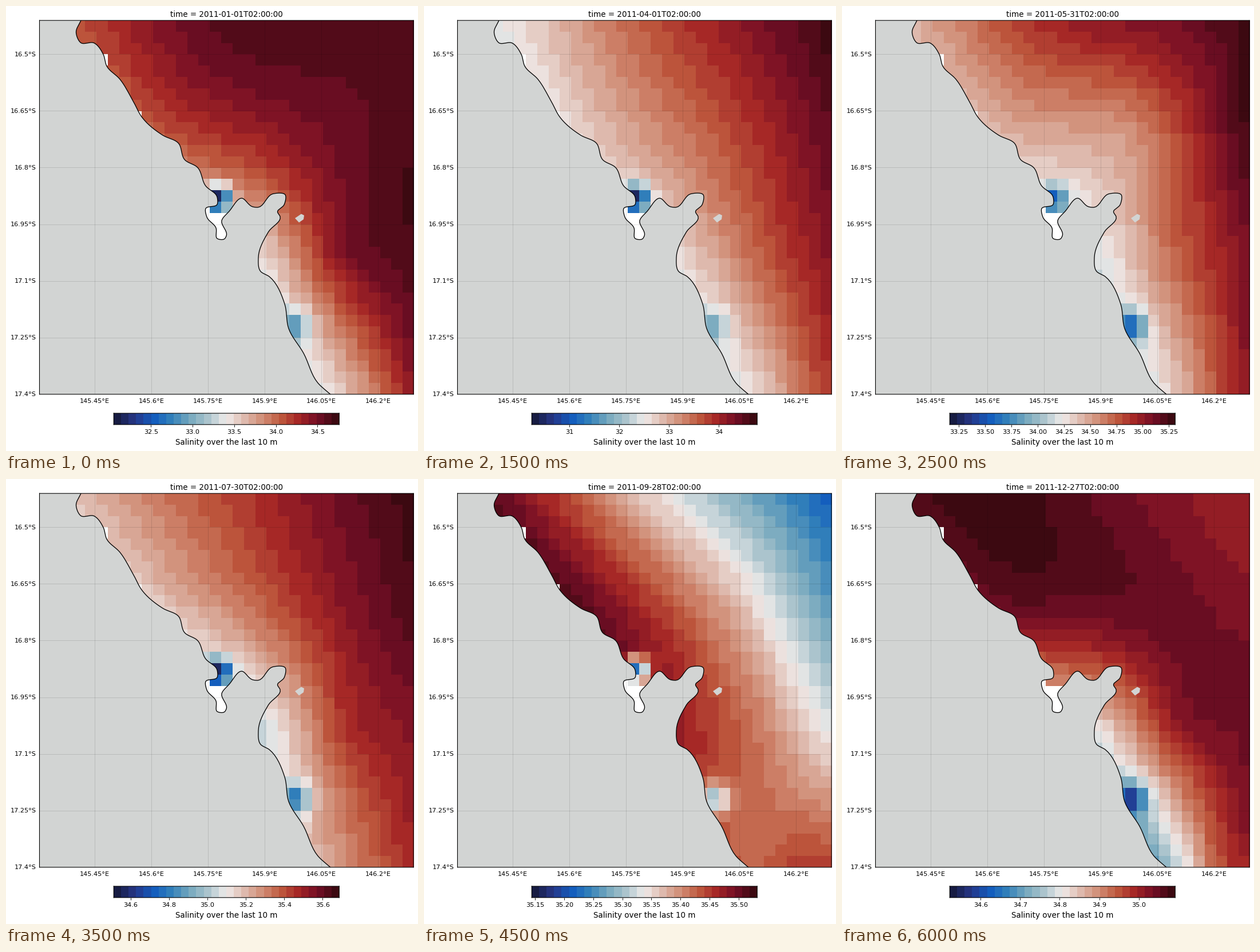
Recreate the animation shown at these times as a matplotlib script. Size 720 by 778 pixels, loop 6500 ms.

```python
import numpy as np
import matplotlib.pyplot as plt
from matplotlib.animation import FuncAnimation
from matplotlib.colors import LinearSegmentedColormap
from matplotlib.patches import Polygon
from matplotlib.ticker import MaxNLocator, ScalarFormatter

W, H = 720, 778
DPI = 100
PX = 72 / DPI  # points per pixel
L, R, T, B = 58.5, 712.1, 25.2, 678.8
CELLS = 33
BANDS = 30
FRAMES = 13
STEP = 99.05  # pixels between grid lines
LAND = "#d2d4d3"

plt.rcParams["font.family"] = "DejaVu Sans"

cmap = LinearSegmentedColormap.from_list("salt", [
    "#171c42", "#273789", "#125cbe", "#3482ba", "#76a8be", "#adc6ce",
    "#f0eceb", "#dfbbaf", "#d18d76", "#bf5a3e", "#a52525", "#730e26",
    "#3c0911"], N=BANDS)

# Key points of the coast in stage pixels, north to south
COAST = [
    (131, 25), (122.5, 46), (131, 64.5), (153.5, 64.5), (170, 84.5),
    (176, 105), (199, 128), (221.5, 165), (238, 195), (274, 226),
    (301.5, 240), (312, 268.5), (335, 282.5), (348.5, 314), (369, 334),
    (369, 347), (349, 354), (351, 369), (367, 388), (369, 406.5), (382, 407),
    (385, 402), (377, 375), (390, 359), (412, 336), (431, 351), (440, 352),
    (466, 328.5), (488, 330), (486, 347.5), (474.5, 360), (479, 368),
    (458.5, 395), (441, 440), (444.5, 463.5), (460, 473), (487, 521),
    (494, 564), (520, 607), (545, 659), (567, 679),
]
ISLAND = [(505, 371), (516, 363.5), (521, 366), (520, 373), (512, 378.5)]

# Four sections of the sea: row, column at the coast
SECTIONS = [(0, 4), (10, 12), (20, 20), (32, 26)]
EAST = CELLS - 1
NODES = np.array([(c, r) for r, coast in SECTIONS
                  for c in (coast, (coast + EAST) / 2, EAST)], float)
ROWS, COLS = np.mgrid[:CELLS, :CELLS].astype(float)

# Stored months: step -> salinity range, fresh water from the inlet and the
# southern river, and (coast, middle, east) of each section, as shares of range
MONTHS = {
    0: (32.054, 34.761, 0.62, 0.24,
        (.78, .975, .975), (.77, .88, .975), (.57, .89, .97), (.56, .70, .86)),
    1: (30.677, 34.993, 0.52, 0.10,
        (.62, .78, 1), (.57, .74, .925), (.51, .69, .86), (.52, .62, .74)),
    3: (30.240, 34.778, 0.55, 0.17,
        (.50, .78, 1), (.57, .74, .935), (.56, .74, .88), (.54, .68, .79)),
    5: (33.163, 35.310, 0.36, 0.32,
        (.62, .86, 1), (.60, .65, .98), (.51, .74, .89), (.57, .73, .87)),
    7: (34.512, 35.686, 0.50, 0.32,
        (.59, .81, 1), (.585, .79, .965), (.49, .80, .885), (.66, .74, .83)),
    9: (35.144, 35.532, 0.75, 0.38,
        (.92, .51, .18), (.93, .67, .32), (.83, .70, .49), (.735, .78, .78)),
    12: (34.522, 35.092, 0, 0.35,
         (.975, .95, .85), (.925, .935, .90), (.56, .865, .92),
         (.44, .72, .84)),
}


def smooth(points, steps=8):
    """Hermite curve through key points, spaced by chord length."""
    p = np.array(points, float)
    s = np.append(0, np.cumsum(np.hypot(*np.diff(p, axis=0).T)))
    slope = np.gradient(p, s, axis=0)
    t = np.linspace(0, 1, steps, endpoint=False)[:, None]
    ease = t * t * (3 - 2 * t)
    curve = [a + (b - a) * ease
             + d * (t * (1 - t) ** 2 * m0 - t * t * (1 - t) * m1)
             for a, b, d, m0, m1 in zip(p, p[1:], np.diff(s), slope, slope[1:])]
    return np.vstack(curve + [p[-1:]])


def kernel(a, b):
    """Thin plate spline kernel between two sets of points."""
    d2 = ((a[:, None] - b[None]) ** 2).sum(-1)
    return 0.5 * d2 * np.log(d2 + 1e-12)


def with_plane(points):
    return np.column_stack([np.ones(len(points)), points])


def surface(values):
    """Smooth surface through the section values, on every cell."""
    plane = with_plane(NODES)
    system = np.block([[kernel(NODES, NODES), plane],
                       [plane.T, np.zeros((3, 3))]])
    weights = np.linalg.solve(system, np.append(values, [0, 0, 0]))
    cells = np.column_stack([COLS.ravel(), ROWS.ravel()])
    basis = np.hstack([kernel(cells, NODES), with_plane(cells)])
    return (basis @ weights).reshape(CELLS, CELLS)


def plume(col, row, spread):
    return np.exp(-((COLS - col) ** 2 + (ROWS - row) ** 2) / spread)


def month(low, high, inlet, river, *sections):
    share = np.clip(surface(np.ravel(sections)), 0, 1)
    share -= inlet * plume(15.2, 15.2, 1.3) + river * plume(22, 26.4, 2)
    share = np.clip(share, 0, 1)
    # Cells without data: the head of the inlet and two spots on the shore
    share[17:, :17] = share[16, 14] = share[3, 5] = share[8, 8] = np.nan
    return low, high, low + share * (high - low)


fields = {step: month(*data) for step, data in MONTHS.items()}


def state(i):
    """Range and salinity of a step, blended between stored months."""
    before = max(k for k in fields if k <= i)
    after = min(k for k in fields if k >= i)
    t = (i - before) / max(after - before, 1)
    return [a + (b - a) * t for a, b in zip(fields[before], fields[after])]


def box(left, top, right, bottom):
    """Axes over a rectangle given in stage pixels."""
    axes = fig.add_axes([left / W, 1 - bottom / H,
                         (right - left) / W, (bottom - top) / H])
    for spine in axes.spines.values():
        spine.set(linewidth=1.1 * PX, snap=False)
    return axes


fig = plt.figure(figsize=(W / DPI, H / DPI), dpi=DPI, facecolor="white")

sea = box(L, T, R, B)
half = 0.5 / (BANDS - 1)
image = sea.imshow(np.zeros((CELLS, CELLS)), cmap=cmap, vmin=-half,
                   vmax=1 + half, extent=(L, R, B, T), aspect="auto",
                   interpolation="nearest")
coast = smooth(COAST)
shore = np.vstack([coast, [(50, 679), (50, 25)]])
for outline in (shore, ISLAND):
    sea.add_patch(Polygon(outline, fc=LAND, ec="none"))
sea.plot(*coast.T, color="black", lw=1.3 * PX, zorder=4)
sea.set(xlim=(L, R), ylim=(B, T), xticks=[], yticks=[])


def write(x, y, text, size, ha="center"):
    return sea.text(x, y, text, size=size * PX, ha=ha, va="baseline")


def degrees(start, k, side):
    return f"{start + 0.15 * k:.2f}".rstrip("0") + "°" + side


grid = dict(color="black", alpha=0.13, lw=0.9 * PX, zorder=3)
for k in range(7):
    y = 84.4 + STEP * k
    sea.axhline(y, **grid)
    write(52.5, y + 3.6, degrees(16.5, k, "S"), 11.2, "right")
for k in range(6):
    x = 155 + STEP * k
    sea.axvline(x, **grid)
    write(x, 694.3, degrees(145.45, k, "E"), 11.2)
title = write((L + R) / 2, 19, "", 13.5)
write((L + R) / 2, 767.5, "Salinity over the last 10 m", 13.5)

bar = box(188.3, 712, 582.3, 731.8)
ramp = bar.imshow(np.arange(BANDS)[None], cmap=cmap, aspect="auto",
                  interpolation="nearest")
bar.set_yticks([])
bar.tick_params(axis="x", labelsize=11.2 * PX, length=4 * PX,
                width=0.9 * PX, pad=3.9 * PX)
bar.xaxis.set_major_locator(MaxNLocator(nbins=9, steps=[1, 2, 2.5, 5, 10]))
bar.xaxis.set_major_formatter(ScalarFormatter(useOffset=False))

START = np.datetime64("2011-01-01T02:00:00")


def draw(i):
    low, high, salt = state(i)
    image.set_data(np.clip((salt - low) / (high - low), 0, 1))
    ramp.set_extent((low, high, 0, 1))
    bar.set_xlim(low, high)
    title.set_text(f"time = {START + np.timedelta64(30 * i, 'D')}")
    return image, ramp, title


anim = FuncAnimation(fig, draw, frames=FRAMES, interval=500, repeat=True,
                     repeat_delay=0, blit=False)
plt.show()
```
